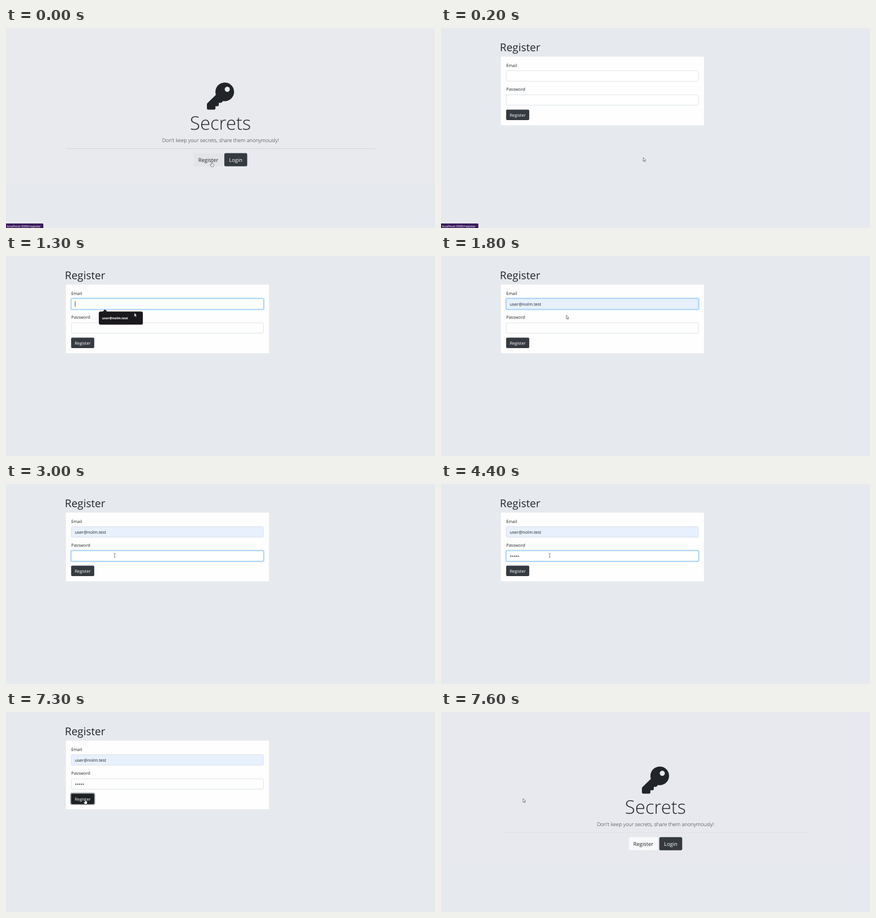
An HTML page for the animation above (8 s loop, 758x354 px).

```html
<!DOCTYPE html>
<html lang="en">
<head>
<meta charset="utf-8">
<title>Secrets</title>
<style>
  html, body { margin: 0; width: 100%; height: 100%; overflow: hidden; background: #e6e9ee; }
  svg { display: block; width: 758px; height: 354px; }
  text { font-family: "Open Sans", "Noto Sans", sans-serif; font-size: 7.5px; fill: #212529; text-rendering: geometricPrecision; }
  .mid { text-anchor: middle; }
  .big { font-size: 9.35px; }
  .light { font-weight: 300; }
  .white { fill: #fff; }
</style>
</head>
<body>
<svg viewBox="0 0 758 354" xmlns="http://www.w3.org/2000/svg">
  <rect width="758" height="354" fill="#e6e9ee"/>

  <g id="home">
    <rect width="758" height="354" fill="#e6eaee"/>
    <rect id="hero" width="758" height="277" fill="#e9eaee"/>
    <g transform="translate(355 96.5) scale(.09375)">
      <path fill="#212529" fill-rule="evenodd" d="M512 176A176 176 0 0 1 303 349L279 376Q272 384 261 384H224V424Q224 448 200 448H160V488Q160 512 136 512H24Q0 512 0 488V410Q0 400 7 393L169 231A176 176 0 1 1 512 176ZM336 128a48 48 0 1 0 96 0a48 48 0 1 0 -96 0Z"/>
    </g>
    <text class="mid light" x="379" y="180" style="font-size:32.8px">Secrets</text>
    <text class="mid light" x="378.9" y="201.6" style="font-size:9.15px">Don't keep your secrets, share them anonymously!</text>
    <rect id="rule" x="107" y="213" width="545" height="1"/>
    <rect id="regBtn" x="332" y="221.5" width="51" height="23.3" rx="2.4"/>
    <text class="mid big" x="357.5" y="237.1">Register</text>
    <rect x="385.7" y="221.5" width="40.5" height="23.3" rx="2.4" fill="#343a40"/>
    <text class="mid big white" x="405.9" y="237.1">Login</text>
  </g>

  <g id="form">
    <text x="104" y="41.4" style="font-size:18.9px;font-weight:500">Register</text>
    <rect x="105.4" y="50.2" width="359.7" height="122.3" rx="1.5" fill="#fefefe" stroke="#e0e3e7" stroke-width=".5"/>
    <text x="115.2" y="68.8">Email</text>
    <rect id="mailRing" x="114.4" y="74.7" width="341.4" height="20.4" rx="2.6" fill="none" stroke="#bfdeff" stroke-width="1.8"/>
    <rect id="mailBox" x="115.3" y="75.6" width="339.6" height="18.6" rx="1.8" stroke-width=".7"/>
    <text id="mail" x="121.7" y="87.8">user@nolm.test</text>
    <text x="115.2" y="111.3">Password</text>
    <rect id="passRing" x="114.4" y="117.4" width="341.4" height="20" rx="2.6" fill="none" stroke="#bfdeff" stroke-width="1.8"/>
    <rect id="passBox" x="115.3" y="118.3" width="339.6" height="18.2" rx="1.8" fill="#fff" stroke-width=".7"/>
    <g id="dots" fill="#212529"></g>
    <rect id="caret" width=".8" height="10.2" fill="#212529"/>
    <rect id="sendRing" x="114.3" y="143.7" width="42.4" height="20" rx="2.6" fill="none" stroke="#999ca0" stroke-width="1.7"/>
    <rect id="send" x="115.1" y="144.5" width="40.8" height="18.4" rx="1.9"/>
    <text class="mid white" x="135.6" y="156.7">Register</text>
    <g id="tip">
      <path d="M170.6 98.6L174.8 94.6L179 98.6Z" fill="#1b181d"/>
      <rect x="164" y="98.2" width="77.8" height="23.3" rx="3.2" fill="#1b181d"/>
      <text class="white" x="169.8" y="111.9" style="font-size:5.8px;font-weight:700">user@nolm.test</text>
    </g>
  </g>

  <g id="status">
    <path d="M0 346H64.5Q66 346 66 347.5V354H0Z" fill="#3b1b5c"/>
    <text class="white" x="1.6" y="353.4" style="font-size:5.6px">localhost:3000/register</text>
  </g>

  <g id="pointer">
    <path id="arrow" d="M0 0V6.6L1.5 5.2L2.6 7.5L3.6 7L2.6 4.8H4.6Z" fill="#fff" stroke="#222" stroke-width=".55" stroke-linejoin="round"/>
    <path id="hand" d="M-.7 .6Q0 -.5 .7 .6V3.3Q3.4 3.2 3.6 4.6V6.3Q3.5 7.6 2.8 8.8H-.8L-2.7 5.6Q-2.5 4.6 -.7 5.7Z" fill="#fff" stroke="#222" stroke-width=".55" stroke-linejoin="round"/>
    <path id="beam" d="M-1.4 -3.5H-.4L0 -3.1L.4 -3.5H1.4M0 -3.1V3.1M-1.4 3.5H-.4L0 3.1L.4 3.5H1.4" fill="none" stroke="#333" stroke-width=".6"/>
  </g>
</svg>
<script>
const LOOP = 8000, STEP = 100;
const el = {};
document.querySelectorAll("[id]").forEach(n => el[n.id] = n);

const set = (id, attrs) => { for (const k in attrs) el[id].setAttribute(k, attrs[k]); };
const show = (id, on) => set(id, { visibility: on ? "inherit" : "hidden" });
const within = (t, a, b) => t >= a && t < b;
const ramp = (t, a, len) => Math.min(1, Math.max(0, (t - a) / len));

for (let i = 0; i < 5; i++) {
  const c = document.createElementNS("http://www.w3.org/2000/svg", "circle");
  c.setAttribute("cx", 123.4 + i * 3.25);
  c.setAttribute("cy", 127.8);
  c.setAttribute("r", 1);
  el.dots.append(c);
}

// time, x, y of the pointer's hot spot
const path = [
  [0, 363.5, 236.8], [100, 359, 231], [200, 357.3, 229.3], [900, 208, 86],
  [1000, 212, 88], [1100, 223, 98], [1200, 223, 98], [1300, 226.8, 100.8],
  [1700, 226.8, 100.8], [2100, 192, 126.3], [6400, 192, 126.3],
  [6800, 139.8, 154.3], [7300, 139.8, 154.3], [7400, 145, 153]
];

function pointerAt(t) {
  let i = path.length - 1;
  while (path[i][0] > t) i--;
  const a = path[i], b = path[i + 1] || a;
  const u = ramp(t, a[0], b[0] - a[0] || 1), e = u * u * (3 - 2 * u);
  return [a[1] + (b[1] - a[1]) * e, a[2] + (b[2] - a[2]) * e];
}

function drawPointer(t, home, tip) {
  const [x, y] = pointerAt(t);
  const inX = x > 115 && x < 455;
  const overField = !home && !tip && inX && (within(y, 75, 95) || within(y, 118, 137));
  const overSend = !home && within(x, 115, 156) && within(y, 144, 163);
  const hand = t < 100 || overSend;
  set("pointer", { transform: `translate(${x} ${y})` });
  show("hand", hand);
  show("beam", overField);
  show("arrow", !hand && !overField);
  return overSend;
}

function field(name, focus) {
  set(name + "Ring", { opacity: focus });
  set(name + "Box", { stroke: focus > 0.5 ? "#80bdff" : "#d0dae1" });
}

function draw(t) {
  const home = t < 100 || t >= 7400;
  const tip = within(t, 1100, 1400);
  const filled = t >= 1400;
  show("home", home);
  show("form", !home);
  show("status", t < 400);
  set("regBtn", { fill: t < 100 ? "#e2e4e8" : "#f8f9fa" });
  set("rule", { fill: t < 100 ? "#d3d5d9" : "#e0e2e6" });
  set("hero", { fill: t < 100 ? "#e9eaee" : "#e8e9ee", height: t < 100 ? 277 : 270 });

  field("mail", ramp(t, 950, 150) - ramp(t, 2050, 150));
  field("pass", t < 7300 ? ramp(t, 2050, 150) : 0);
  set("mailBox", { fill: filled ? "#e8f0fe" : "#fff" });
  show("mail", filled);
  show("tip", tip);

  const count = t < 3500 ? 0 : t < 3700 ? 3 : t < 3900 ? 4 : 5;
  [...el.dots.children].forEach((c, i) => c.setAttribute("visibility", i < count ? "inherit" : "hidden"));

  const inMail = within(t, 1000, 1400);
  show("caret", inMail || within(t, 2100, 2600) || within(t, 3500, 4400) || within(t, 5800, 6000));
  set("caret", { x: 121.8 + count * 3.18, y: inMail ? 79.8 : 122.4 });

  const hover = drawPointer(t, home, tip);
  set("send", { fill: t >= 7300 ? "#1d2124" : hover ? "#23272b" : "#343a40" });
  show("sendRing", t >= 7300);
}

function tick() {
  const t = performance.now() % LOOP;
  draw(Math.floor(t / STEP) * STEP);
  requestAnimationFrame(tick);
}
tick();
</script>
</body>
</html>
```
